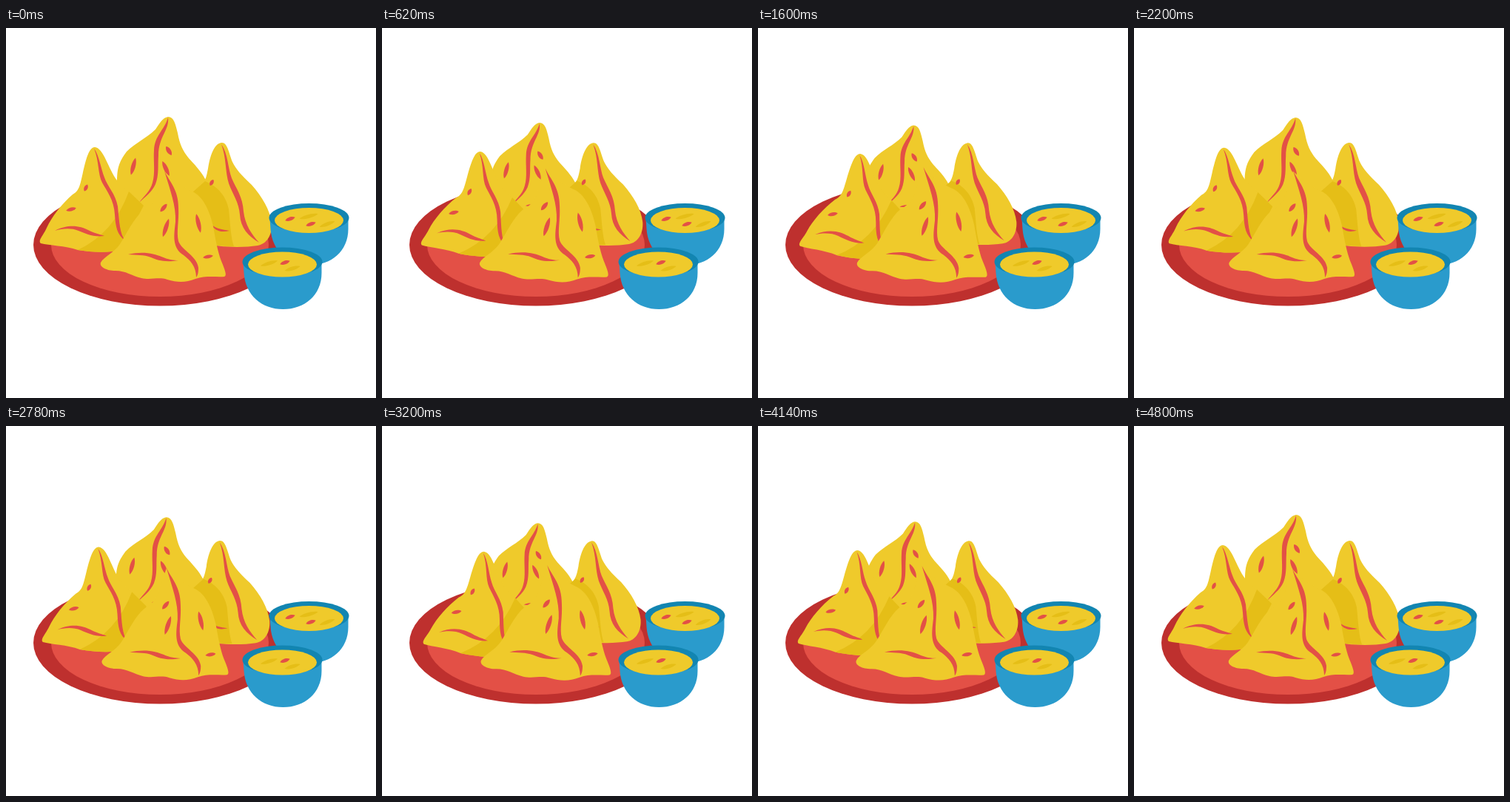
An HTML page with a canvas that plays this animation: 500 px wide and 500 px high, repeating every 4820 ms.

```html
<!DOCTYPE html>
<html lang="en">
<head>
<meta charset="utf-8">
<title>Samosas</title>
<style>
html, body { margin: 0; width: 100%; height: 100%; overflow: hidden; background: #fff; }
canvas { display: block; width: 500px; height: 500px; }
</style>
</head>
<body>
<canvas id="stage" width="500" height="500"></canvas>
<script>
const ctx = document.getElementById('stage').getContext('2d');
const YELLOW = '#efca2b', SHADE = '#e5be17', RED = '#e35046', DARK_RED = '#be302e';
const BLUE = '#2a9bcc', DARK_BLUE = '#1285b1';
const PERIOD = 2410;

function fill(color, d) {
  ctx.fillStyle = color;
  ctx.fill(new Path2D(d));
}

function ellipse(color, x, y, rx, ry) {
  ctx.fillStyle = color;
  ctx.beginPath();
  ctx.ellipse(x, y, rx, ry, 0, 0, Math.PI * 2);
  ctx.fill();
}

// Pointed spot: half length, half width, angle in degrees
function leaf(color, x, y, length, width, angle) {
  ctx.save();
  ctx.translate(x, y);
  ctx.rotate(angle * Math.PI / 180);
  const w = width * 1.3;
  fill(color, `M${-length} 0C${-length / 2} ${-w} ${length / 2} ${-w} ${length} 0C${length / 2} ${w} ${-length / 2} ${w} ${-length} 0`);
  ctx.restore();
}

// Draw with a rotation and scale about a pivot
function posed(x, y, degrees, scale, draw) {
  ctx.save();
  ctx.translate(x, y);
  ctx.rotate(degrees * Math.PI / 180);
  ctx.scale(scale, scale);
  ctx.translate(-x, -y);
  draw();
  ctx.restore();
}

function backSamosa() {
  fill(YELLOW, 'M219 120C227 120 229 130 232 142C235 158 239 166 247 176C260 190 266 197 271 208L275 260L165 260L150 210C150 190 152 182 163 167C175 155 190 149 202 137C208 128 212 121 219 120Z');
  fill(RED, 'M219 121C221 138 206 147 206 172C205 186 207 198 202 211C197 222 188 228 180 236C186 227 195 221 198 209C202 196 199 180 200 165C201 145 214 138 219 121Z');
  leaf(RED, 172, 187, 12, 3, -75);
  leaf(RED, 220, 166, 7, 3, 58);
  leaf(RED, 216, 190, 11, 3, 65);
  leaf(RED, 206, 236, 7, 1.3, -10);
}

function leftSamosa() {
  fill(YELLOW, 'M120 161C112 161 108 178 104 195C100 213 99 220 90 225C75 238 62 255 55 270C50 281 43 287 47 291C58 294 80 294 97 300C115 303 140 304 155 300L186 240L166 221C160 216 154 211 150 206C138 190 132 162 120 161Z');
  fill(SHADE, 'M166 221L186 240L155 300C140 304 115 303 97 300Q146 277 166 221Z');
  fill(RED, 'M119 163C126 172 128 190 133 202C137 214 148 224 151 241C153 262 154 279 161 287C150 280 148 268 147 252C146 232 136 220 130 209C124 198 126 180 119 163Z');
  fill(RED, 'M66 274C85 264 101 268 111 273S125 278 133 281C118 283 108 278 98 274C88 270 76 271 66 274Z');
  leaf(RED, 108, 216, 5, 2.5, -65);
  leaf(RED, 88, 245, 7, 2.5, -15);
}

function rightSamosa() {
  fill(YELLOW, 'M291 155C281 156 275 175 273 190C271 200 270 205 266 210L252 222L262 290C290 297 320 297 340 294C352 292 360 280 359 264C357 246 346 228 332 212C318 199 311 191 306 181C301 168 299 154 291 155Z');
  fill(SHADE, 'M269 207C284 213 297 225 301 245C303 265 304 285 308 295Q285 295 262 290L252 222Z');
  fill(RED, 'M291 157C300 170 300 190 305 203C311 217 320 228 321 248C323 266 332 279 342 290C327 281 317 270 316 252C315 236 306 224 301 210C296 194 298 176 291 157Z');
  fill(RED, 'M276 264C284 272 292 272 302 274C290 277 282 274 276 264Z');
  leaf(RED, 278, 209, 4.5, 2.5, -60);
}

function frontSamosa() {
  fill(YELLOW, 'M214 194C224 204 240 216 254 222C268 230 276 250 280 268C283 285 286 302 291 315C296 327 299 335 295 336C285 337 270 334 256 339C243 344 232 344 218 340C206 336 196 341 183 338C170 335 162 328 148 328C136 328 126 323 128 317C132 309 146 304 154 292C163 278 172 258 184 248C196 241 201 236 205 220Z');
  fill(RED, 'M214 193C221 208 233 218 233 243C234 262 230 275 233 288C237 300 258 308 260 324C260 331 259 334 257 337C257 322 249 314 240 307C224 297 227 280 229 262C230 240 222 220 214 193Z');
  fill(RED, 'M165 306C185 301 201 305 210 309S226 314 233 314C215 317 205 314 196 310C186 306 176 307 165 306Z');
  leaf(RED, 213, 243, 7, 2.8, -50);
  leaf(RED, 216, 270, 13, 3, -72);
  leaf(RED, 260, 264, 13, 3, 77);
  leaf(RED, 273, 309, 7, 2.5, -10);
}

function bowl(x, y, spots) {
  fill(BLUE, `M${x - 53} ${y}L${x - 52} ${y + 14}C${x - 50} ${y + 44} ${x - 28} ${y + 63} ${x + 1} ${y + 63}S${x + 53} ${y + 44} ${x + 53} ${y + 14}L${x + 53} ${y}Z`);
  ellipse(DARK_BLUE, x, y - 1, 54, 19.5);
  ellipse(YELLOW, x, y + 2.5, 46.5, 17);
  for (const spot of spots) leaf(...spot);
}

function draw(now) {
  const p = (1 - Math.cos(now / PERIOD * Math.PI * 2)) / 2;
  ctx.fillStyle = '#fff';
  ctx.fillRect(0, 0, 500, 500);
  ellipse(DARK_RED, 208, 293, 171, 82.5);
  ellipse(RED, 208, 293, 147, 70);
  posed(75, 312, 0, 1 - 0.08 * p, backSamosa);
  posed(-6, 444, 5 * p, 1, leftSamosa);
  posed(-68, 172, 0, 1 - 0.03 * p, rightSamosa);
  posed(-22, 320, 0, 1 + 0.053 * p, frontSamosa);
  bowl(409.5, 257.5, [
    [SHADE, 409, 254.5, 13, 2.5, -15],
    [SHADE, 434, 265, 11, 2.5, -20],
    [RED, 384, 258, 7, 2.5, -18],
    [RED, 412, 265, 7, 2.5, -18]
  ]);
  bowl(373.5, 317, [
    [SHADE, 355.5, 318, 12, 2.5, -17],
    [SHADE, 387, 325, 11, 2.5, -16],
    [RED, 377, 317, 7, 2.5, -18]
  ]);
  requestAnimationFrame(draw);
}
draw(0);
</script>
</body>
</html>
```
